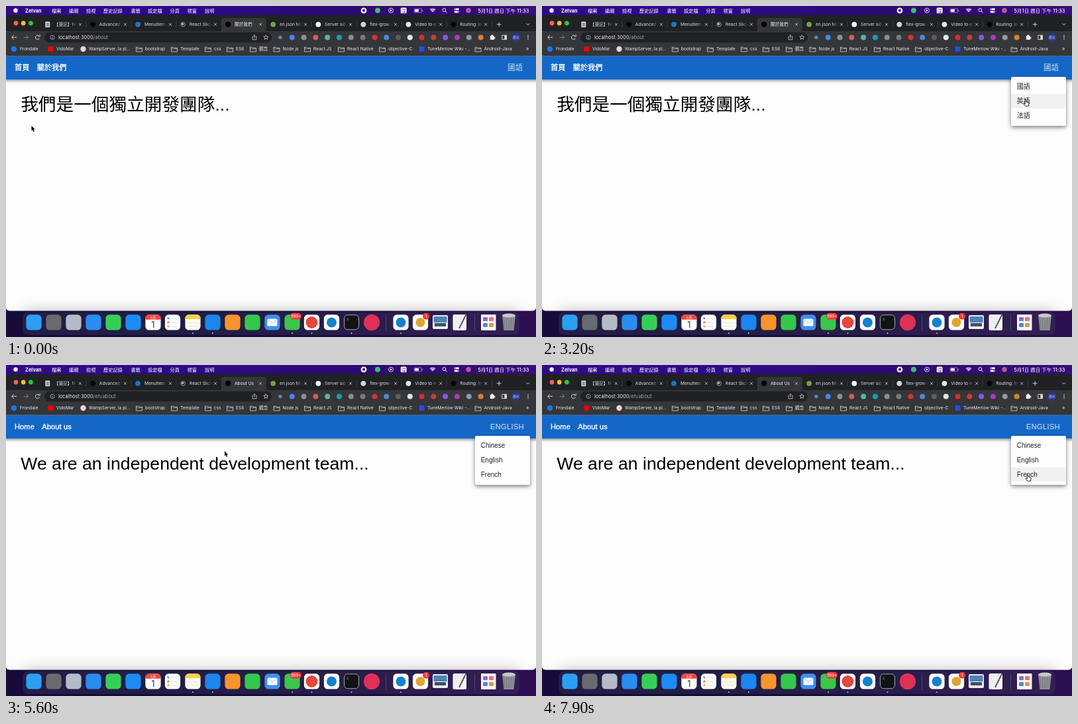
An HTML page with a canvas that plays this animation: 800 by 500 pixels, repeating every 8000 ms.

```html
<!DOCTYPE html>
<html lang="zh-Hant">
<head>
<meta charset="utf-8">
<title>i18n demo</title>
<style>
html, body { margin: 0; width: 100%; height: 100%; overflow: hidden; background: #fdfdfd; }
canvas { display: block; width: 800px; height: 500px; }
</style>
</head>
<body>
<canvas id="stage"></canvas>
<script>
const W = 800, H = 500, LOOP = 8000, STEP = 100;
const canvas = document.getElementById('stage');
const dpr = window.devicePixelRatio || 1;
canvas.width = W * dpr;
canvas.height = H * dpr;
const c = canvas.getContext('2d');

const CJK = '"Noto Sans CJK TC", "Noto Sans CJK", sans-serif';
const UI = 'Inter, ' + CJK;
const PAGE = '"Liberation Sans", ' + CJK;

const MENU_AT = 2000, SWITCH_AT = 3700, BUBBLE_AT = 4300;
const ZH = {
  nav: ['首頁', '關於我們'], navX: [13, 46.7], lang: '國語', langX: 757.3,
  items: ['國語', '英語', '法語'], title: '我們是一個獨立開發團隊...', tab: '關於我們', path: '/about'
};
const EN = {
  nav: ['Home', 'About us'], navX: [13, 54.3], lang: 'ENGLISH', langX: 731,
  items: ['Chinese', 'English', 'French'], title: 'We are an independent development team...',
  tab: 'About Us', path: '/en/about'
};

// Pointer: time, x, y
const PATH = [
  [0, 38.5, 181], [400, 38.5, 181], [1400, 686.5, 120], [1900, 764, 96], [2500, 764, 96],
  [3200, 730, 142], [3600, 730, 142], [4350, 80, 95], [4700, 528, 206], [5200, 528, 212],
  [6000, 132, 48], [6400, 144.5, 31], [6800, 148, 46], [7500, 735, 152], [7900, 733, 166], [8000, 733, 166]
];

function pointer(t) {
  let i = 0;
  while (i < PATH.length - 2 && t >= PATH[i + 1][0]) i++;
  const [t0, x0, y0] = PATH[i], [t1, x1, y1] = PATH[i + 1];
  let k = (t - t0) / (t1 - t0);
  k = k * k * (3 - 2 * k);
  return [x0 + (x1 - x0) * k, y0 + (y1 - y0) * k];
}

const clamp = v => Math.max(0, Math.min(1, v));
const inside = ([x, y], l, t, r, b) => x >= l && x < r && y >= t && y < b;

function rect(x, y, w, h, color) {
  c.fillStyle = color;
  c.fillRect(x, y, w, h);
}
function box(x, y, w, h, r, color) {
  c.beginPath();
  c.roundRect(x, y, w, h, r);
  c.fillStyle = color;
  c.fill();
}
function dot(x, y, r, color) {
  c.beginPath();
  c.arc(x, y, r, 0, 7);
  c.fillStyle = color;
  c.fill();
}
function ring(x, y, r, color, w = 0.8, from = 0, to = 7) {
  c.beginPath();
  c.arc(x, y, r, from, to);
  c.strokeStyle = color;
  c.lineWidth = w;
  c.stroke();
}
function line(color, w, ...p) {
  c.beginPath();
  c.moveTo(p[0], p[1]);
  for (let i = 2; i < p.length; i += 2) c.lineTo(p[i], p[i + 1]);
  c.strokeStyle = color;
  c.lineWidth = w;
  c.stroke();
}
function text(s, x, y, size, color, { font = UI, weight = 400, space = 0, thick = 0, align = 'left' } = {}) {
  c.font = `${weight} ${size}px ${font}`;
  c.letterSpacing = space + 'px';
  c.textAlign = align;
  c.fillStyle = color;
  c.fillText(s, x, y);
  if (thick) {
    c.strokeStyle = color;
    c.lineWidth = thick;
    c.strokeText(s, x, y);
  }
  const w = c.measureText(s).width;
  c.letterSpacing = '0px';
  return w;
}
function gradient(x0, y0, x1, y1, ...stops) {
  const g = c.createLinearGradient(x0, y0, x1, y1);
  stops.forEach((s, i) => g.addColorStop(i / (stops.length - 1), s));
  return g;
}
function shadow(blur, dy, color) {
  c.shadowBlur = blur * dpr;
  c.shadowOffsetY = dy * dpr;
  c.shadowColor = color;
}

function menuBar() {
  rect(0, 0, W, 20, gradient(0, 0, W, 0, '#33098a', '#2d0a8a', '#2d0a72', '#3a0c7c'));
  dot(14.5, 6.8, 3.2, '#fff');
  text('Zelvan', 29, 9.5, 7.4, '#fff', { weight: 700 });
  const menus = [['檔案', 69], ['編輯', 95], ['檢視', 121], ['歷史記錄', 147], ['書籤', 188.5],
    ['設定檔', 214], ['分頁', 247.5], ['視窗', 273.5], ['說明', 300]];
  for (const [s, x] of menus) text(s, x, 9.5, 7.25, '#fff', { weight: 500 });

  dot(540, 6.8, 4.4, '#fff');
  box(538.2, 5, 3.6, 3.6, 0.6, '#2d0a66');
  dot(561, 6.8, 4, '#3fbf68');
  ring(581, 6.8, 3.5, '#fff');
  c.beginPath();
  c.moveTo(580, 5); c.lineTo(583, 6.8); c.lineTo(580, 8.6);
  c.fillStyle = '#fff';
  c.fill();
  box(595.8, 2.5, 8.8, 8.8, 1.6, '#fff');
  text('注', 600.2, 9.5, 7, '#2d0a66', { align: 'center', weight: 500 });
  c.beginPath();
  c.roundRect(616, 4, 11.5, 5.8, 1.6);
  c.strokeStyle = '#b7a6cc';
  c.lineWidth = 0.7;
  c.stroke();
  box(617, 5, 6, 3.8, 0.8, '#fff');
  rect(628.2, 6, 0.9, 2, '#b7a6cc');
  for (const r of [2, 4, 6]) ring(644, 10, r, '#fff', 1.1, -2.3, -0.84);
  ring(661.3, 6, 2.5, '#fff', 0.9);
  line('#fff', 1, 663.2, 8, 665.5, 10.2);
  box(676.5, 3.4, 7.4, 2.8, 1.4, '#fff');
  box(676.5, 7.4, 7.4, 2.8, 1.4, '#fff');
  dot(678.2, 4.8, 0.8, '#37105f');
  dot(682.3, 8.8, 0.8, '#37105f');
  dot(698, 6.8, 3.8, '#b55a9a');
  text('5月1日 週日 下午 11:33', 789.5, 9.5, 7.4, '#fff', { align: 'right', weight: 500, space: 0.1 });
}

function tabs(copy, mouse) {
  const list = [['【筆記】N', '#c9cbce'], ['Advanced F', '#050505'], ['MenuItem A', '#1976d2'],
    ['React Slick', '#b9bcc0'], [copy.tab, '#000'], ['en.json Me', '#71a349'], ['Server side', '#fff'],
    ['flex-grow -', '#d5d5d5'], ['Video to ed', '#e6edf2'], ['Routing: In', '#050505']];
  list.forEach(([name, color], i) => {
    const x = 52.5 + i * 68.05, active = i === 4;
    const hover = !active && inside(mouse, x + 1, 17, x + 67, 38);
    if (active) box(x + 0.3, 18, 67.6, 22, [4.5, 4.5, 0, 0], '#35363a');
    else if (hover) box(x + 0.3, 18, 67.6, 20, [4.5, 4.5, 0, 0], '#292a2d');
    if (!active && i !== 3) rect(x + 68, 22.5, 0.6, 10.5, '#4c4e52');
    if (i === 0) {
      box(x + 6.8, 23.5, 7, 8.8, 0.8, color);
      for (let k = 0; k < 3; k++) rect(x + 8.3, 26 + k * 1.8, 4, 0.7, '#44464a');
    } else if (i === 3) {
      ring(x + 10.5, 27.8, 3.3, color);
      dot(x + 10, 27.2, 1.7, color);
    } else dot(x + 10.5, 27.8, active ? 4.2 : 3.9, color);
    const tx = x + 20.3, ink = active ? '#f1f3f4' : '#dfe1e5';
    c.save();
    c.beginPath();
    c.rect(tx, 18, 33.5, 20);
    c.clip();
    text(name, tx, 30.2, 6.67, active ? ink : gradient(tx + 25, 0, tx + 33.5, 0, ink, '#dfe1e500'));
    c.restore();
    const m = x + 59.3;
    line('#d5d7da', 0.8, m - 2, 25.8, m + 2, 29.8);
    line('#d5d7da', 0.8, m + 2, 25.8, m - 2, 29.8);
  });
  line('#e3e4e6', 0.9, 740.8, 27.8, 747.6, 27.8);
  line('#e3e4e6', 0.9, 744.2, 24.4, 744.2, 31.2);
  line('#e3e4e6', 0.9, 785.3, 26.4, 787.8, 28.9, 790.3, 26.4);
}

function toolbar(copy) {
  const ink = '#dfe1e5', dim = '#85878b';
  line(ink, 0.9, 16, 47.3, 8.7, 47.3);
  line(ink, 0.9, 12, 44, 8.7, 47.3, 12, 50.6);
  line(dim, 0.9, 26.3, 47.3, 33.6, 47.3);
  line(dim, 0.9, 30.3, 44, 33.6, 47.3, 30.3, 50.6);
  ring(47.7, 47.3, 3.2, ink, 0.9, 0.4, 5.5);
  line(ink, 0.9, 51.2, 43.4, 51.2, 46, 48.6, 46);

  box(58, 39.8, 343, 15.4, 7.7, '#202124');
  ring(70, 47.4, 3.2, '#bdc1c6', 0.7);
  rect(69.6, 46.8, 0.8, 2.5, '#bdc1c6');
  rect(69.6, 45.4, 0.8, 0.8, '#bdc1c6');
  const w = text('localhost:3000', 79, 50.1, 7.45, '#e8eaed');
  text(copy.path, 79 + w, 50.1, 7.45, '#9aa0a6');
  line(ink, 0.7, 373.4, 46, 372, 46, 372, 50.8, 378, 50.8, 378, 46, 376.6, 46);
  line(ink, 0.7, 375, 49, 375, 43.6);
  line(ink, 0.7, 373.4, 45.2, 375, 43.6, 376.6, 45.2);
  const star = [];
  for (let i = 0; i <= 10; i++) {
    const r = i % 2 ? 1.6 : 3.7, a = i * Math.PI / 5 - Math.PI / 2;
    star.push(392.3 + r * Math.cos(a), 47.5 + r * Math.sin(a));
  }
  line(ink, 0.7, ...star);

  const colors = ['#5689c8', '#4285f4', '#8c8e91', '#d85b5b', '#55b6a4', '#159fae', '#8b8d90', '#777b7f', '#d63430',
    '#4d86d8', '#5b5d61', '#e2e5e8', '#d92d2d', '#c83d36', '#8a55e8', '#a43dc0', '#95989b', '#dc812f'];
  colors.forEach((color, i) => dot(414 + i * 17.8, 47.4, i === 0 ? 2.7 : 4, color));
  box(730.8, 45, 6, 6, 0.8, '#f1f3f4');
  dot(733.8, 44.7, 1.5, '#f1f3f4');
  dot(737, 48, 1.5, '#f1f3f4');
  c.strokeStyle = ink;
  c.lineWidth = 0.9;
  c.strokeRect(748.8, 44.2, 6.6, 6.4);
  rect(752.4, 44.2, 3, 6.4, ink);
  dot(769.8, 47.4, 6.4, '#293593');
  text('晨光', 769.8, 49.2, 4.9, '#dfe3ff', { align: 'center' });
  for (let i = -1; i < 2; i++) dot(788, 47.4 + i * 2.6, 0.8, ink);
}

function bookmarks() {
  dot(12, 65, 4.2, '#1877f2');
  box(63.5, 61.2, 7.6, 7.6, 1.6, '#f00');
  dot(116.5, 65, 4.2, '#e5d5dc');
  box(623.5, 61, 8, 8, 0.6, '#1f4fe0');
  const items = [['Frondale', 21], ['VidoMar', 76], ['WampServer, la pl...', 125], ['bootstrap', 210, 1],
    ['Template', 263, 1], ['css', 314, 1], ['ES6', 347, 1], ['觀念', 382, 1], ['Node.js', 417.5, 1],
    ['React.JS', 464, 1], ['React Native', 515, 1], ['objective-C', 577, 1],
    ['TuneMerlow Wiki -...', 636], ['Android-Java', 721.5, 1]];
  for (const [s, x, folder] of items) {
    text(s, x, 67.4, 6.67, '#e8eaed');
    if (!folder) continue;
    const l = x - 13.5;
    line('#d4d6d9', 0.8, l, 62.3, l + 3.3, 62.3, l + 4.4, 63.4, l + 9, 63.4, l + 9, 69, l, 69, l, 62);
    line('#d4d6d9', 0.6, l, 64.7, l + 9, 64.7);
  }
  text('»', 785, 67.4, 7.5, '#e8eaed');
}

function browser(copy, mouse) {
  box(0, 13.5, W, 30, [5, 5, 0, 0], '#202124');
  ['#ff5f57', '#febc2e', '#28c840'].forEach((color, i) => dot(15 + i * 11.2, 26, 3.4, color));
  rect(0, 38, W, 38, '#35363a');
  tabs(copy, mouse);
  toolbar(copy);
  bookmarks();
}

function page(copy, mouse, t) {
  // The dock casts its shadow on the window's lower edge
  c.save();
  c.beginPath();
  c.roundRect(0, 75.5, W, 385, [0, 0, 5, 5]);
  c.clip();
  rect(0, 75.5, W, 386, '#fdfdfd');
  shadow(22, 0, 'rgba(0,0,0,.3)');
  box(25, 462.5, 750, 34.5, 8, '#25233f');
  c.restore();

  c.save();
  shadow(5, 2, 'rgba(0,0,0,.5)');
  c.beginPath();
  c.rect(0, 75.5, W, 60);
  c.clip();
  rect(-10, 75.5, W + 20, 35.5, '#1567c7');
  c.restore();

  copy.nav.forEach((s, i) => text(s, copy.navX[i], 97.4, 11.11, '#fff',
    { font: PAGE, weight: 500, space: 0.083, thick: 0.35 }));
  if (inside(mouse, 751, 81, 787, 106)) box(751, 81, 36, 25, 2.2, 'rgba(255,255,255,.12)');
  text(copy.lang, copy.langX, 97.4, 11.11, '#c3d8f0', { font: PAGE, space: 0.317, thick: 0.15 });
  text(copy.title, 22.2, 158.3, 26.67, '#000', { font: PAGE });

  const grow = clamp((t - MENU_AT) / 200);
  if (grow) {
    c.save();
    c.globalAlpha = grow;
    c.translate(750, 107);
    c.scale(0.75 + grow * 0.25, 0.56 + grow * 0.44);
    c.translate(-750, -107);
    c.save();
    shadow(6, 2.4, 'rgba(0,0,0,.5)');
    box(708, 107, 83, 74, 2.3, '#fdfdfd');
    c.restore();
    copy.items.forEach((s, i) => {
      const y = 111 + i * 21.75;
      if (inside(mouse, 708, y, 791, y + 21.75)) rect(708, y, 83, 21.75, '#f1f1f1');
      text(s, 716.7, y + 14.4, 10, '#222', { font: PAGE });
    });
    c.restore();
  }

  const fade = clamp((t - BUBBLE_AT) / 100) * clamp((5050 - t) / 500);
  if (fade) {
    c.save();
    c.globalAlpha = fade;
    box(0, 449, 84, 12, [0, 2.5, 0, 0], '#3c4043');
    text('localhost:3000/en/about', 2, 457.4, 6.67, '#e4e6e9');
    c.restore();
  }
}

function tile(x, color) {
  box(x - 11.6, 466.3, 23.2, 23.2, 5.4, color);
}
function badge(s, x, w) {
  box(x - w / 2, 463.8, w, 10, 5, '#f33b3b');
  text(s, x, 471, 5.8, '#fff', { align: 'center' });
}

function dock() {
  rect(0, 440, W, 60, gradient(0, 0, W, 0, '#170b3c', '#110c38', '#1c0c42', '#2c0d52'));
  box(25, 462.5, 750, 34.5, 8, 'rgba(70,70,95,.3)');
  const apps = [[42, '#2b9ff2'], [72, '#686b70'], [102, '#b4bcc8'], [132, '#2a8df0'], [162, '#35cf57'],
    [192, '#1d8bf4'], [222, '#fff'], [251.5, '#fff'], [282, '#fffdf2'], [312, '#1b87ee'], [342, '#f7942c'],
    [372, '#34c84c'], [402, '#3e91ee'], [432, '#3bc64c'], [461.5, '#fff'], [491.5, '#fff'], [521.5, '#111417'],
    [596, '#fff'], [625.5, '#fff']];
  for (const [x, color] of apps) tile(x, color);

  box(210.4, 466.3, 23.2, 7.5, [5.4, 5.4, 0, 0], '#f0473f');
  text('5月', 222, 472.5, 5.2, '#fff', { align: 'center' });
  text('1', 222, 486.2, 13, '#333', { align: 'center' });
  for (let i = 0; i < 3; i++) {
    dot(244.8, 472 + i * 6, 1.4, ['#3b82f6', '#f05040', '#f59b30'][i]);
    rect(248.5, 471.8 + i * 6, 10.5, 0.7, '#c8c8ca');
  }
  box(270.4, 466.3, 23.2, 6.6, [5.4, 5.4, 0, 0], '#fbd04b');
  for (let i = 0; i < 2; i++) rect(273, 478 + i * 5, 18, 0.6, '#d5d2c6');
  box(394.5, 472.5, 15, 11, 1.6, '#f4f8fc');
  line('#9bb9dc', 0.8, 395, 473.5, 402, 479, 409, 473.5);
  dot(461.5, 478, 9, '#e3493c');
  dot(491.5, 478, 7.5, '#1581cf');
  dot(596, 478, 7.5, '#1581cf');
  dot(625.5, 478, 7, '#e0a52f');
  c.beginPath();
  c.roundRect(510.5, 466.8, 22, 22, 5);
  c.strokeStyle = '#a9adb0';
  c.lineWidth = 1;
  c.stroke();
  text('$', 514, 474.5, 5.5, '#4fc35a', { font: '"DejaVu Sans Mono", monospace' });
  dot(552, 478, 12.2, '#df3157');
  badge('999+', 437.5, 17);
  badge('1', 634, 10);

  rect(573.3, 466, 0.7, 24, '#55536c');
  rect(707, 466, 0.7, 24, '#55536c');

  box(644, 467, 23, 21, 2, '#e9edf2');
  rect(645.5, 469, 20, 9, '#4f83b9');
  rect(647, 479, 17, 5, '#42505d');
  box(674.5, 466, 20.5, 24, 2.5, '#f5f5f3');
  for (let i = 0; i < 6; i++) rect(677, 470 + i * 3, 14, 0.5, '#c5c8ca');
  line('#4e5359', 1.8, 694, 467, 684, 487);

  box(717, 466, 22.5, 24, 1, '#f6f7fa');
  ['#8b6cc0', '#e47480', '#5688c6', '#d49d48'].forEach((color, i) =>
    box(720 + i % 2 * 9, 470 + (i >> 1) * 9, 7, 6, 1, color));

  c.beginPath();
  c.moveTo(749, 467); c.lineTo(769, 467); c.lineTo(766.5, 490); c.lineTo(751.5, 490);
  c.fillStyle = '#8c9196';
  c.fill();
  c.beginPath();
  c.ellipse(759, 467.5, 10, 3, 0, 0, 7);
  c.fillStyle = '#c7c9cc';
  c.fill();
  for (let i = -2; i < 3; i++) line('#6c7075', 0.8, 759 + i * 3.8, 471, 759 + i * 3, 488);

  for (const x of [282, 312, 432, 461.5, 521.5, 596]) dot(x, 494.2, 1, '#c5c4cf');
}

const ARROW = new Path2D('M0 0V7.6L1.7 6.1L2.9 9L4.3 8.4L3.1 5.6H5.4Z');
const HAND = new Path2D('M-.9 .2Q0-.9 .9 .2L1.2 3.2Q2.2 2.5 2.6 3.5Q3.8 3 4 4.1Q5.3 3.9 5.2 5.2' +
  'L4.3 9.2H-.3L-2.9 5.8Q-3 4.6-1.8 4.9L-.6 6Z');

function drawPointer(mouse, t) {
  const hand = t >= MENU_AT && inside(mouse, 708, 111, 791, 177) || inside(mouse, 54, 86, 100, 101);
  c.save();
  c.translate(mouse[0], mouse[1]);
  c.lineJoin = 'round';
  if (hand) {
    c.fillStyle = '#fff';
    c.strokeStyle = '#111';
    c.lineWidth = 0.9;
    c.fill(HAND);
    c.stroke(HAND);
  } else {
    c.strokeStyle = '#fff';
    c.lineWidth = 1.3;
    c.stroke(ARROW);
    c.fillStyle = '#000';
    c.fill(ARROW);
  }
  c.restore();
}

function draw(now) {
  const t = Math.floor(now % LOOP / STEP) * STEP;
  const copy = t < SWITCH_AT ? ZH : EN;
  const mouse = pointer(t);
  c.setTransform(dpr, 0, 0, dpr, 0, 0);
  menuBar();
  dock();
  browser(copy, mouse);
  page(copy, mouse, t);
  drawPointer(mouse, t);
}

const start = performance.now();
function tick() {
  draw(performance.now() - start);
  requestAnimationFrame(tick);
}
tick();
</script>
</body>
</html>
```
